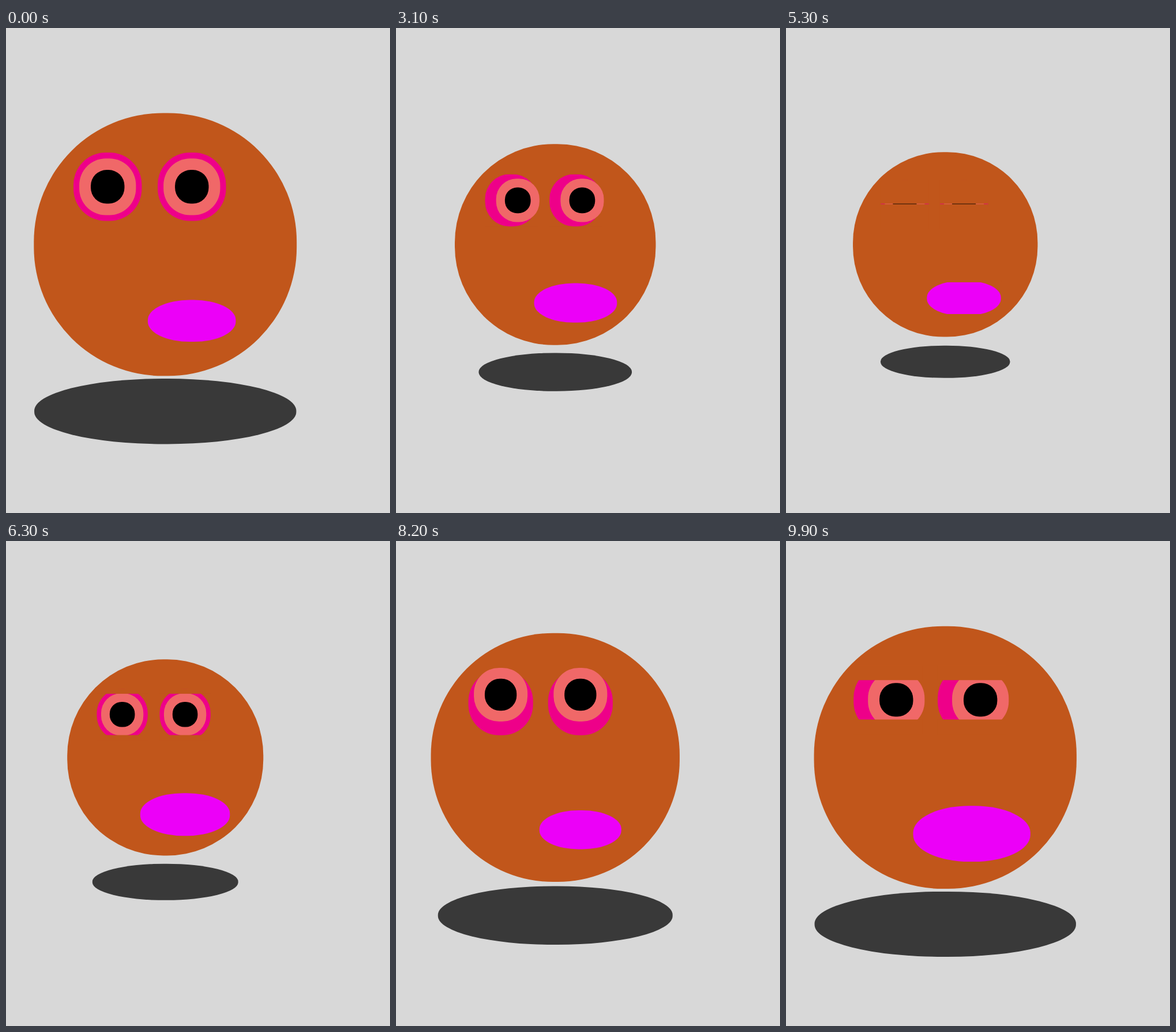
Write an HTML page that moves like this. It is 666 px wide and 841 px high and loops after 10000 ms.

```html
<!DOCTYPE html>
<html lang="en">
<head>
<meta charset="utf-8">
<title>Bouncing face</title>
<style>
html, body { margin: 0; width: 100%; height: 100%; overflow: hidden; background: #d8d8d8; }
svg { display: block; width: 100%; height: 100%; }
</style>
</head>
<body>
<svg id="stage" viewBox="0 0 666 841"></svg>
<script>
const LOOP = 10000, STEP = 100, START = 19350;
const SKIN = '#c1561b';
const EYE = { size: 118.8, iris: 98.6, pupil: 58.6, y: -100.4, look: 15 };
const MOUTH = { x: 46.1, y: 132.8, ratio: 0.476 };
const stage = document.getElementById('stage');

function add(parent, tag, fill) {
  const node = document.createElementNS('http://www.w3.org/2000/svg', tag);
  if (fill) node.setAttribute('fill', fill);
  return parent.appendChild(node);
}

function set(node, attrs) {
  for (const key in attrs) node.setAttribute(key, attrs[key]);
}

// Rounded box given by its centre, size and corner radius as a share of the size.
function box(node, cx, cy, w, h, round) {
  set(node, { x: cx - w / 2, y: cy - h / 2, width: w, height: h, rx: w * round, ry: h * round });
}

// Pair of skin strips closing over a shape from above and below.
function closeLids(lids, cx, cy, w, h, cover) {
  const c = Math.min(cover, h);
  const shown = c > 0.05 ? 'inline' : 'none';
  set(lids[0], { x: cx - w / 2, y: cy - h / 2, width: w, height: c, display: shown });
  set(lids[1], { x: cx - w / 2, y: cy + h / 2 - c, width: w, height: c, display: shown });
}

const addLids = parent => [add(parent, 'rect', SKIN), add(parent, 'rect', SKIN)];

const face = add(stage, 'g');
const shadow = add(face, 'rect', '#393939');
box(add(face, 'rect', SKIN), 0, 0, 457.2, 457.2, 0.49);

const eyes = [-100.3, 46.2].map(x => {
  const ring = add(face, 'rect', '#ee0089');
  box(ring, x, EYE.y, EYE.size, EYE.size, 0.47);
  return { x, iris: add(face, 'rect', '#f06868'), pupil: add(face, 'rect', '#000'), lids: addLids(face) };
});
const mouth = add(face, 'rect', '#ec00f8');
const mouthLids = addLids(face);

// The standard "ease" curve, cubic-bezier(.25, .1, .25, 1).
function ease(x) {
  let lo = 0, hi = 1;
  for (let i = 0; i < 24; i++) {
    const u = (lo + hi) / 2;
    if (0.75 * u * (1 - u) + u ** 3 < x) lo = u; else hi = u;
  }
  const v = 1 - lo;
  return 0.3 * v * v * lo + 3 * v * lo * lo + lo ** 3;
}

// Eased value between [position, value] stops of a repeating cycle.
function track(time, period, stops) {
  const p = (time % period) / period;
  const i = Math.max(1, stops.findIndex(s => s[0] >= p));
  const [p0, v0] = stops[i - 1], [p1, v1] = stops[i];
  return v0 + (v1 - v0) * ease((p - p0) / (p1 - p0));
}

function draw(ms) {
  const t = START + Math.floor((ms % LOOP) / STEP) * STEP;

  const scale = track(t, 10000, [[0, 1], [0.5, 0.7], [1, 1]]);
  set(face, { transform: `translate(276.25 375.4) scale(${scale})` });
  box(shadow, 0, 290.2, 457 * scale, 114 * scale, 0.49);

  const dx = EYE.look * track(t, 6000, [[0, 0], [0.63, 0], [0.66, 1], [0.97, 1], [1, 0]]);
  const dy = -EYE.look * track(t, 6000, [[0, 0], [0.3, 0], [0.33, 1], [0.63, 1], [0.66, 0], [1, 0]]);
  const blink = track(t, 4000, [[0, 0], [0.1, 66], [0.7, 0], [1, 0]]);
  for (const eye of eyes) {
    box(eye.iris, eye.x + dx, EYE.y + dy, EYE.iris, EYE.iris, 0.47);
    box(eye.pupil, eye.x + dx, EYE.y + dy, EYE.pupil, EYE.pupil, 0.47);
    closeLids(eye.lids, eye.x, EYE.y, EYE.size + 1, EYE.size + 1, blink);
  }

  const w = track(t, 4000, [[0, 148.6], [0.5, 210.2], [1, 148.6]]);
  const h = w * MOUTH.ratio;
  box(mouth, MOUTH.x, MOUTH.y, w, h, 0.48);
  const shut = track(t, 4000, [[0, 0], [0.1, 0.5], [0.2, 0], [1, 0]]);
  closeLids(mouthLids, MOUTH.x, MOUTH.y, w + 1, h + 1, shut > 0 ? shut * h + 0.5 : 0);
}

const begin = performance.now();
function tick() {
  draw(performance.now() - begin);
  requestAnimationFrame(tick);
}
draw(0);
requestAnimationFrame(tick);
</script>
</body>
</html>
```
